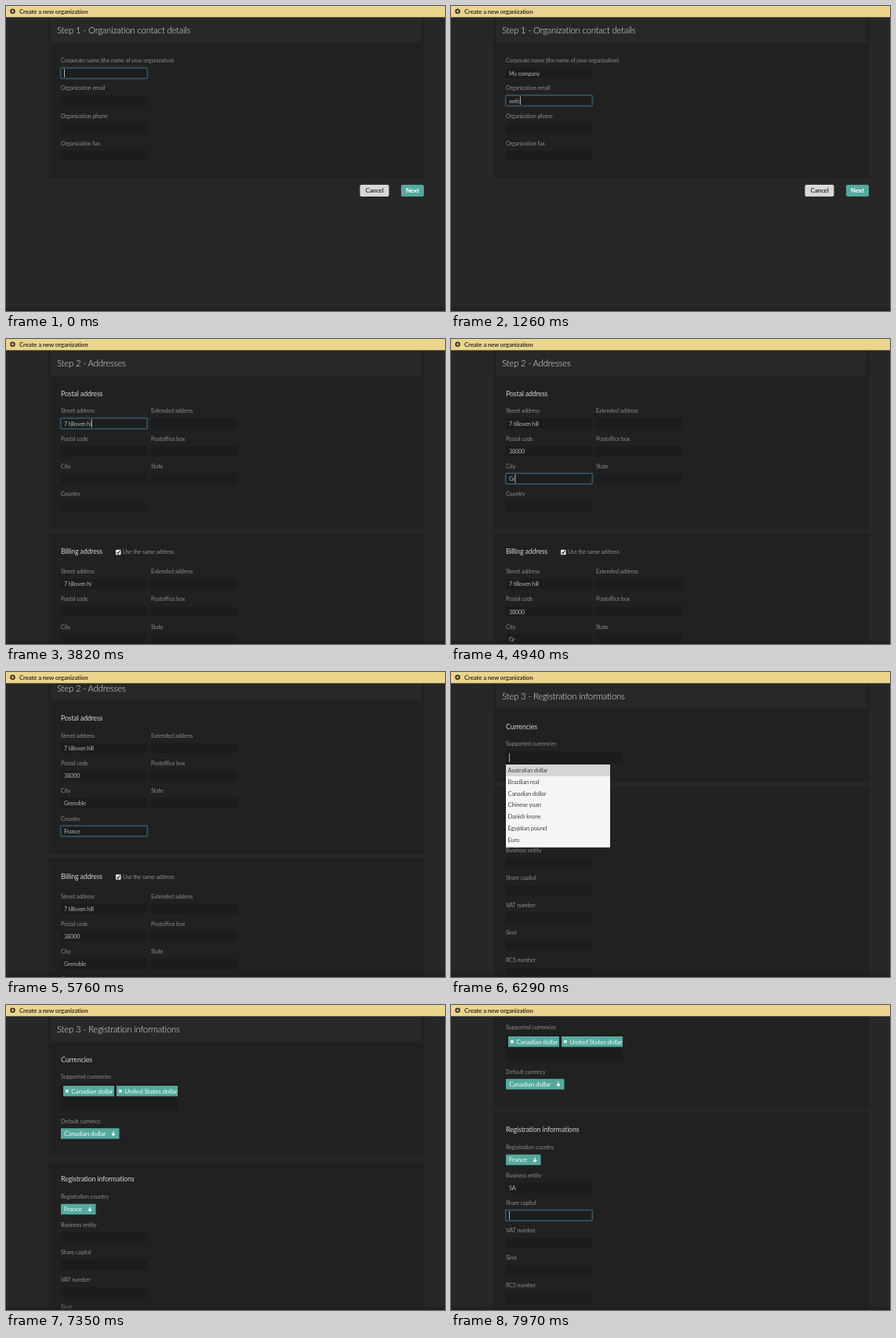
Write an HTML page that moves like this. It is 560 px wide and 389 px high and loops after 8 s.

```html
<!DOCTYPE html>
<html lang="en">
<head>
<meta charset="utf-8">
<title>Create a new organization</title>
<style>
  html, body { margin: 0; width: 100%; height: 100%; overflow: hidden; background: #272727; }
  svg { display: block; width: 100vw; height: 100vh; }
  text { font-family: Lato, "Open Sans", sans-serif; letter-spacing: -.02em; white-space: pre; }
  .title { font-size: 11.4px; font-weight: 300; fill: #e6e6e6; }
  .section { font-size: 8.9px; fill: #d2d2d2; }
  .label { font-size: 7.2px; fill: #8b8b8b; }
  .value { font-size: 7.2px; fill: #b4b4b4; }
  .item { font-size: 7.5px; fill: #444; }
  .tag { font-size: 8.2px; fill: #f2fbf9; }
  .button { font-size: 8px; font-weight: 700; text-anchor: middle; }
  .bar { font-size: 7.9px; font-weight: 700; fill: #37332a; }
</style>
</head>
<body>
<svg viewBox="0 0 560 389" preserveAspectRatio="none">
  <defs>
    <linearGradient id="shade" x1="0" y1="0" x2="0" y2="1">
      <stop offset="0" stop-color="#1c1719" stop-opacity="0"/>
      <stop offset="1" stop-color="#1c1719" stop-opacity=".6"/>
    </linearGradient>
  </defs>
  <rect width="560" height="389" fill="#272727"/>
  <g id="page"></g>
  <rect y="383" width="560" height="6" fill="url(#shade)"/>
  <rect width="560" height="14.3" fill="#ebd58d"/>
  <circle cx="8.5" cy="6.8" r="3.3" fill="#37332a"/>
  <path d="M6.8 6.8h3.4M8.5 5.1v3.4" stroke="#ebd58d" stroke-width="1.1"/>
  <text class="bar" x="17" y="9.5">Create a new organization</text>
</svg>
<script>
const LOOP = 8000;
const TEAL = '#55a99e';
const EMAIL = 'welcome@org.example';
const STREET = '7 tilloven hill';
const CURRENCIES = [
  'Australian dollar', 'Brazilian real', 'Canadian dollar', 'Chinese yuan',
  'Danish krone', 'Egyptian pound', 'Euro', 'Hong Kong dollar',
  'New Zealand dollar', 'South African rand', 'United States dollar'
];
const page = document.getElementById('page');

// Value of the last [time, value] pair already reached.
const at = (t, list) => list.reduce((v, [start, x]) => t >= start ? x : v, list[0][1]);

// Part of a string typed in even steps from t0 to t1, after the first `from` letters.
function typed(s, t, t0, t1, steps, from = 0) {
  if (t < t0) return s.slice(0, from);
  const k = Math.min(steps, Math.floor((t - t0) * (steps - 1) / (t1 - t0) + 1e-6) + 1);
  return s.slice(0, from + Math.floor((s.length - from) * k / steps));
}

const rect = (x, y, w, h, fill, more = '') =>
  `<rect x="${x}" y="${y}" width="${w}" height="${h}" fill="${fill}" ${more}/>`;
const text = (cls, x, y, s, more = '') =>
  `<text class="${cls}" x="${x}" y="${y}" ${more}>${s}</text>`;
const panel = (y, h) => rect(54, y, 479.5, h, '#212121');
const heading = s => rect(57, 10, 473.5, 37, '#282828') + text('title', 65, 35, s);
const caret = (y, h = 10.5) => `<rect class="caret" x="74" y="${y}" width=".9" height="${h}" fill="#c4c4c4"/>`;

function field(x, y, name, value = '', focus = '', showCaret = true) {
  const on = name && name === focus;
  const frame = on
    ? rect(x - .8, y - .8, 111.6, 14.6, 'none', 'rx="1.5" stroke="#2f5062" stroke-width="1.6" opacity=".5"') +
      rect(x, y, 110, 13, '#1b1d1f', 'rx="1" stroke="#44687b" stroke-width=".9"')
    : rect(x, y, 110, 13, '#1b1c1d');
  return frame + text('value', x + 4, y + 9.3, value, on ? 'id="active"' : '') +
    (on && showCaret ? caret(y + 1.2) : '');
}

const labelled = (x, y, label, ...rest) =>
  text('label', x, y + 2.4, label) + field(x, y + 9.2, ...rest);

function buttons(y, nextFill = TEAL) {
  return rect(451.5, y, 37, 15, '#d8d8d8', 'rx="2"') +
    text('button', 470, y + 10.3, 'Cancel', 'fill="#333"') +
    rect(504, y, 29, 15, nextFill, 'rx="2"') +
    text('button', 518.5, y + 10.3, 'Next', 'fill="#fff"');
}

function contactPage(t) {
  const focus = t < 860 ? 'name' : 'email';
  const name = typed('My company', t, 40, 760, 9);
  const email = t < 1760
    ? typed(EMAIL.slice(0, 8), t, 960, 1560, 7)
    : typed(EMAIL, t, 1760, 2260, 6, 8);
  return panel(10, 209.5) + heading('Step 1 - Organization contact details') +
    labelled(70, 70, 'Corporate name (the name of your organization)', 'name', name, focus) +
    labelled(70, 105, 'Organization email', 'email', email, focus) +
    labelled(70, 140.2, 'Organization phone') +
    labelled(70, 175.3, 'Organization fax') +
    buttons(228, at(t, [[0, TEAL], [2460, '#4b9a90'], [2480, '#418b81']]));
}

function addressFields(y, v, focus, showCaret) {
  const rows = [['Street address', 'Extended address'], ['Postal code', 'Postoffice box'], ['City', 'State'], ['Country']];
  return rows.map((row, r) => row.map((label, c) =>
    labelled(70 + c * 115, y + r * 35.2, label, label, v[label], focus, showCaret)).join('')).join('');
}

function addressPage(t) {
  const values = {
    'Street address': t < 3120 ? typed(STREET.slice(0, 2), t, 2820, 2920, 2) : typed(STREET, t, 3120, 3920, 9, 2),
    'Postal code': typed('38000', t, 4140, 4540, 5),
    'City': typed('Grenoble', t, 4940, 5200, 4),
    'Country': typed('France', t, 5470, 5560, 2)
  };
  const focus = at(t, [
    [0, ''], [2620, 'Street address'], [3940, 'Extended address'], [4040, 'Postal code'],
    [4640, 'Postoffice box'], [4740, 'City'], [5290, 'State'], [5380, 'Country']
  ]);
  const scroll = at(t, [[0, 0], [5760, 10.5], [5860, 52], [5960, 95]]);
  return `<g transform="translate(0 ${-scroll})">` +
    panel(10, 232) + heading('Step 2 - Addresses') +
    text('section', 70, 72.8, 'Postal address') +
    addressFields(92, values, focus, t < 5660) +
    panel(248, 199) +
    text('section', 70, 274.2, 'Billing address') +
    rect(140, 268.7, 6.6, 6.6, '#e8eef2', 'rx="1"') +
    '<path d="M141.3 272l1.6 1.8 2.6-4" fill="none" stroke="#1f3a4a" stroke-width="1.2"/>' +
    text('label', 149, 274.4, 'Use the same address') +
    addressFields(296.8, values, '', false) +
    buttons(456, t < 6060 ? TEAL : '#418b81') + '</g>';
}

function tag(x, w, s) {
  return rect(x, 103, w, 13.4, TEAL) +
    `<path d="M${x + 3.2} 108l3.4 3.4m0-3.4l-3.4 3.4" stroke="#fff" stroke-width="1.4"/>` +
    text('tag', x + 10.3, 112.6, s);
}

function select(y, w, s) {
  const x = 70 + w - 7.5;
  return rect(70, y, w, 13.5, TEAL) + text('tag', 74, y + 9.6, s) +
    `<path d="M${x} ${y + 4}v5m-2-2l2 2.2 2-2.2" fill="none" stroke="#fff" stroke-width="1.3"/>`;
}

function menu(y, items, picked) {
  const h = 14.93;
  return rect(70, y, 133, items.length * h + 1.2, '#f5f5f5') +
    items.map((s, i) => (i === picked ? rect(70, y, 133, h, '#d5d5d5', `transform="translate(0 ${i * h})"`) : '') +
      text('item', 72.6, y + i * h + 9.7, s)).join('');
}

function registrationPage(t) {
  const tags = t < 6590 ? [] : CURRENCIES.filter(c => c === 'Canadian dollar' || (t >= 7230 && c === 'United States dollar'));
  const query = at(t, [[0, ''], [6390, 'ca'], [6490, 'can'], [6590, ''], [6660, 'd'], [6790, 'do'], [6860, 'dol'], [7230, '']]);
  const open = (t >= 6290 && t < 6590) || (t >= 6660 && t < 7230);
  const picked = at(t, [[0, 0], [7030, 1], [7100, 2], [7160, 3]]);
  const focus = at(t, [[0, ''], [6200, 'currency'], [7300, ''], [7370, 'entity'], [7870, 'capital']]);
  const scroll = at(t, [[0, 0], [7370, 30], [7470, 63]]);
  const some = tags.length > 0;
  const top = some ? 199 : 146;
  const row = some ? 121 : 104;
  const items = CURRENCIES.filter(c => c.toLowerCase().includes(query) && !tags.includes(c)).slice(0, 7);

  let out = panel(10, some ? 183.5 : 130.5) + heading('Step 3 - Registration informations') +
    text('section', 70, 72.8, 'Currencies') + text('label', 70, 94.4, 'Supported currencies') +
    rect(70, 101, 149, some ? 33.5 : 17, '#1b1c1d');
  if (some) {
    out += tag(73, 65, tags[0]) + text('label', 70, 150.6, 'Default currency') + select(157.2, 74.5, 'Canadian dollar');
    if (tags[1]) out += tag(141, 78, tags[1]);
  }
  if (focus === 'currency') {
    out += text('tag', 74, row + 8.2, query, 'id="active" style="fill:#929292"') + caret(row - .5, 11);
  }
  out += panel(top, 320) +
    text('section', 70, top + 26, 'Registration informations') +
    text('label', 70, top + 48, 'Registration country') + select(top + 54.7, 44.5, 'France') +
    labelled(70, top + 81.5, 'Business entity', 'entity', at(t, [[0, ''], [7570, 'S'], [7670, 'SA']]), focus) +
    labelled(70, top + 116.6, 'Share capital', 'capital', '', focus, t >= 7970) +
    ['VAT number', 'Siret', 'RCS number'].map((s, i) => labelled(70, top + 151.7 + i * 35.1, s)).join('') +
    (open ? menu(some ? 135 : 118, items, picked) : '');
  return `<g transform="translate(0 ${-scroll})">${out}</g>`;
}

let shown = '';
function render(t) {
  const draw = at(t, [[0, contactPage], [2580, addressPage], [6160, registrationPage]]);
  const markup = draw(t);
  if (markup === shown) return;
  shown = page.innerHTML = markup;
  const active = page.querySelector('#active');
  const bar = page.querySelector('.caret');
  if (active && bar) bar.setAttribute('x', +active.getAttribute('x') + active.getComputedTextLength());
}

const start = performance.now();
function tick() {
  render((performance.now() - start) % LOOP);
  requestAnimationFrame(tick);
}
tick();
</script>
</body>
</html>
```
